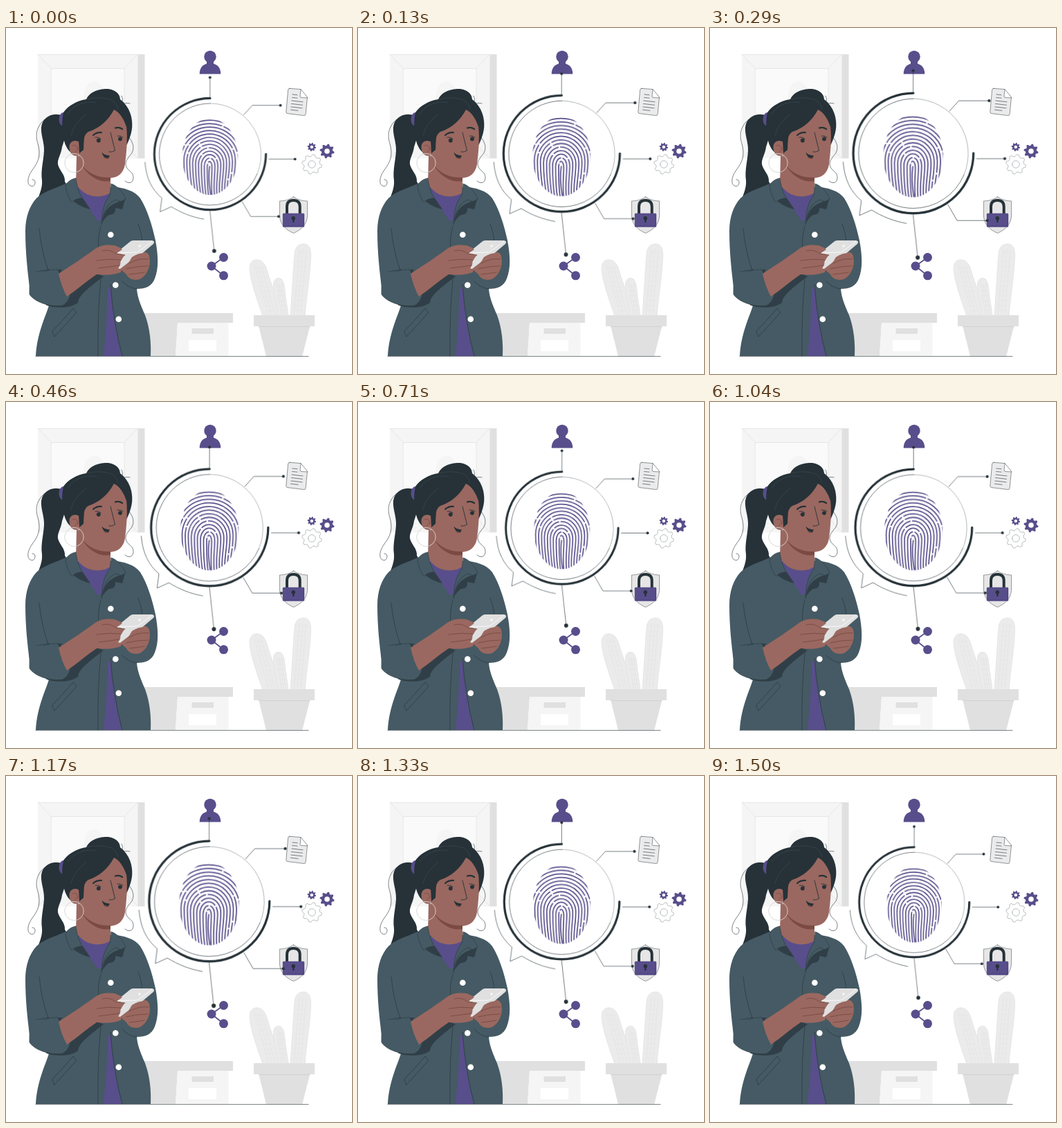
Write an HTML page that moves like this. It is 500 px wide and 500 px high and loops after 1540 ms.

```html
<!DOCTYPE html>
<html lang="en">
<head>
<meta charset="utf-8">
<title>Fingerprint access</title>
<style>
  html, body { margin: 0; width: 100%; height: 100%; overflow: hidden; background: #fff; }
  svg { display: block; width: 100vw; height: 100vh; }
  path { stroke-linejoin: round; stroke-linecap: round; }
  .dark { fill: #263238; }
  .coat { fill: #455a64; }
  .shade { fill: #303f47; }
  .skin { fill: #9a6860; }
  .blush { fill: #7b4a43; }
  .purple { fill: #584e8b; }
  .g1 { fill: #f5f5f5; }
  .g2 { fill: #ebebeb; }
  .g3 { fill: #e0e0e0; }
  .white { fill: #fff; }
  .ink { fill: none; stroke: #263238; stroke-width: .6; }
  .pale { fill: none; stroke: #e0e0e0; stroke-width: .7; }
  #pulse { transform-origin: 310px 197px; }
</style>
</head>
<body>
<svg viewBox="0 0 500 500">
  <defs>
    <clipPath id="oval"><ellipse cx="295" cy="186" rx="39.500" ry="54.500"/></clipPath>
  </defs>

  <!-- room -->
  <path class="g3" d="M190 38H200.500V188.500H190Z"/>
  <path class="g1" d="M46 38H190.500V188.500H46Z"/>
  <path fill="#fafafa" stroke="#e0e0e0" stroke-width=".7" d="M65.500 58.500H171V168H65.500Z"/>
  <path class="g1" d="M112 103Q114 78 128 77Q141 78 144 103Z"/>
  <path class="pale" d="M46 38.500H190M46 38L65.500 58.500M190.500 38L171 58.500M190.500 188L171 168M46 188L65.500 168"/>
  <path class="g3" d="M195 412H328V426H248L245 474H195Z"/>
  <path class="g1" d="M248 426H321.500V474H245Z"/>
  <path class="g3" d="M268.500 434H300V442H268.500Z"/>
  <path class="white" d="M264 451H304V467H264Z"/>

  <!-- cacti -->
  <g class="g2" stroke="#e3e3e3" stroke-width=".8">
    <path d="M371 416C363 393 353 366 352 348C352 338 358 334 364 335C372 336 376 344 379 356C385 376 394 395 397 416Z"/>
    <path d="M393 416C390 398 386 382 386.500 370C387 363 391 361 395 361.500C400 362 402 369 403 379C404 392 407 404 408 416Z"/>
    <path d="M411 416C413 385 415 352 417 326C418 316 423 312 430 312C437 312 441 318 440.500 329C440 356 434 388 432 416Z"/>
  </g>
  <g id="spikes" class="pale"></g>
  <path class="g3" d="M365 430H439.500L428 474.500H376Z"/>
  <path class="g3" d="M358 415H446V431H358Z"/>
  <path d="M365.500 431.500H439" stroke="#d2d2d2" fill="none"/>

  <!-- icons -->
  <g class="purple">
    <circle cx="295" cy="41.500" r="8.700"/>
    <path d="M279.700 66.500C279.700 56 286 51 295 51S310.300 56 310.300 66.500Z"/>
    <path d="M290 48H300V54H290Z"/>
    <path d="M314.500 331.500L297 344L314.500 358" fill="none" stroke="#584e8b" stroke-width="1.700"/>
    <circle cx="314.500" cy="331.500" r="6.500"/><circle cx="297" cy="344" r="6.500"/><circle cx="314.500" cy="357.800" r="6.500"/>
  </g>
  <path fill="#ebebeb" stroke="#263238" stroke-width=".5" d="M410 87.300L426 88.600L435.500 100L433 124.500Q432.700 126.800 430.500 126.500L407 123.600Q404.500 123.200 404.800 121L407.600 89.500Q407.900 87.200 410 87.300ZM426 88.600L425 99Q425 100.300 427 100.500L435.500 101"/>
  <path class="ink" d="M414 96L421 96.700M413.600 100.500L421 101.200M413 105L429 106.800M412.500 109.500L428.500 111.300M412 114L428 115.800M411.600 118.200L422 119.400"/>
  <path id="gearS" class="purple" fill-rule="evenodd"/>
  <path id="gearM" class="purple" fill-rule="evenodd"/>
  <path id="gearL" fill="#fff" stroke="#8b9297" stroke-width=".6"/>
  <path fill="#e6e6e6" stroke="#263238" stroke-width=".45" d="M415.500 244Q424 250 435.500 250V272C435 284 426 292 415.500 296.500C405 292 396 284 395.500 272V250Q407 250 415.500 244Z"/>
  <path d="M406 269V258Q406 249 415.300 249Q424.700 249 424.700 258V269" fill="none" stroke="#263238" stroke-width="4"/>
  <rect class="purple" x="399.800" y="267.800" width="31.400" height="20" rx="1.500"/>
  <path d="M401 286H430V270" fill="none" stroke="#473f73" stroke-width=".6"/>
  <path class="dark" d="M415.300 272A2.800 2.800 0 0 1 416.600 277.300L416.300 281H414.300L414 277.300A2.800 2.800 0 0 1 415.300 272Z"/>

  <!-- speech ring -->
  <g id="pulse">
    <path class="ink" d="M202.500 194C204 216 212 233 226.500 245L224 264.500L240 257.300C254 266 269 272 286 275"/>
    <path class="ink" d="M295.300 110.300A72.400 72.400 0 0 0 295.300 255.100A72.400 72.400 0 0 0 362 211"/>
    <path class="ink" stroke-opacity=".55" d="M295.300 110.300A72.400 72.400 0 0 1 362 211"/>
    <path d="M295.200 102.900A79.400 79.400 0 1 0 374.600 182.300" fill="none" stroke="#263238" stroke-width="3"/>
    <path class="ink" d="M295 73.300V102M343 126.500L355.300 113H395M379 189.500H416M341 250.500L353 271.200H393M295 264L301 320"/>
    <g class="dark">
      <circle cx="295" cy="73.300" r="1.900"/><circle cx="395.300" cy="113" r="1.900"/><circle cx="416" cy="189.500" r="1.900"/>
      <circle cx="392.700" cy="271.200" r="1.900"/><circle cx="301" cy="320.200" r="2.800"/>
    </g>
    <g id="print" clip-path="url(#oval)" fill="none" stroke="#584e8b" stroke-width="1.600"></g>
  </g>

  <path class="ink" d="M43 474.500H437"/>

  <!-- hair behind -->
  <path class="dark" d="M84 128C74 122 60 124 53 136C47 149 56 163 55 178C54 193 50 206 52 220C53 231 48 240 46 248C56 243 74 241 90 230L85 222C86 212 77 206 75 197C74 189 80 182 81 172L88 150Z"/>
  <path class="ink" d="M56 132C44 142 42 154 46 167C50 181 48 191 41 201C35 209 31 216 32 223C33 230 42 231 42 223Q42 219 38 219"/>
  <ellipse class="purple" cx="83" cy="132" rx="6.500" ry="10"/>
  <path class="dark" d="M150 96C166 100 177 112 181 128C184 142 182 153 174 170L160 160Z"/>
  <path class="ink" d="M175 155C183 163 187 173 181 182C175 189 171 194 174 201C177 207 184 208 184 216C184 224 177 226 172 221M167 111Q170 103 167 98M166 112Q172 107 179 109"/>

  <!-- neck and shirt -->
  <path class="purple" d="M100 230L154 230L160 250L168 474H138L120 270Z"/>
  <path class="skin" d="M102 184L151 205V238Q141 245 126 243Q112 241 101 226Z"/>

  <!-- face -->
  <path class="skin" d="M108 150L128 117L163 109C171 117 173 128 174 141C176 160 174 181 172 197C170 209 163 216 150 217C134 217 115 207 105 191Z"/>
  <path class="blush" d="M108 196C119 211 134 217 151 216V221C135 224 119 215 108 196Z"/>
  <path class="dark" d="M106 180Q112 177 112 168C112 159 114 153 119 150C134 145 147 135 156 118C163 121 170 130 174 143C180 128 176 113 165 105C166 94 155 87 143 88C130 89 120 94 116 103C102 105 89 113 83 122C80 136 81 150 84 163C87 174 92 180 98 182Z"/>
  <path d="M116 103Q136 98 153 104Q160 108 162 117M89 125C98 109 118 105 130 108M94 155Q98 137 116 125" fill="none" stroke="#45535a" stroke-width=".5"/>
  <path class="skin" d="M106 165C98 160 91 165 91.500 173C92 182 98 187 106 184Z"/>
  <path d="M96 170Q103 167 104 176Q101 175 100 180" fill="none" stroke="#7b4a43" stroke-width=".8"/>
  <path class="dark" d="M105 162L113 153L112 176L106 181Z"/>
  <circle cx="98.500" cy="195" r="13.700" fill="none" stroke="#d4d4d4" stroke-width=".9"/>
  <g fill="none" stroke="#263238">
    <path stroke-width="2.200" d="M126 155Q131 150.500 138 151M158 144.500Q163 142.500 168 146"/>
    <path stroke-width=".9" d="M129 158Q133 157 137 160M161 156Q165 155 169 158M151 151L157.500 177Q154 180 149 179"/>
  </g>
  <circle class="dark" cx="133.800" cy="162.500" r="2.900"/><circle class="dark" cx="165" cy="160.300" r="2.900"/>
  <path class="dark" d="M138.500 179.500Q142 184 150 184.500L147.500 189Q140 188 138.500 179.500Z"/>
  <path class="blush" d="M141 186Q144 188 148 187.500Q145 191 141 187Z"/>

  <!-- coat -->
  <path class="coat" d="M89 224C72 231 53 237 44 246C34 257 28 273 28 294C28 323 31 350 34 374C35 386 42 394 62 401C57 418 45 440 43 474H141C144 442 147 408 147 373C145 342 139 310 137 285C124 266 110 250 101 222Z"/>
  <path class="coat" d="M153 229C171 231 186 235 194 246C204 262 211 284 216 307C220 329 221 347 215 362C211 373 202 377 189 377C190 390 195 401 201 415C208 434 210 455 209 474H167C160 445 152 402 151 371C143 340 137 307 138 283Z"/>
  <path class="coat" d="M133 278L151 277L158 375H140Z"/>
  <path class="shade" d="M93 240C100 244 106 246 111 246L122 262Q104 258 93 246ZM139 281C141 263 150 254 172 248L168 262L158 260Q159 270 149 270Q144 273 139 281Z"/>
  <path class="coat" stroke="#263238" stroke-width=".5" d="M101 217C95 218 88 222 86 228C87 237 91 246 95 252C99 248 104 246 110 246Q103 234 101 217Z"/>
  <path class="coat" stroke="#263238" stroke-width=".5" d="M152 225C159 227 168 235 173 247L166 251L160 248C150 251 141 260 138 284C138 264 143 250 150 241Z"/>
  <path class="shade" d="M57 400C70 406 94 405 104 397C105 388 113 380 141 359L130 354L92 378L83 399ZM62 356Q66 348 81 349L77 357Z"/>
  <path class="ink" d="M137 286Q132 303 134 322M137 363Q132 414 133 474M48 290Q51 323 62 353M34 352Q47 353 62 349M191 283Q199 304 196 317M67 438Q82 423 97 405L102 411Q86 429 70 446ZM189 377Q177 376 168 366M151 371Q155 425 168 474"/>
  <path class="coat" stroke="#263238" stroke-width=".5" d="M34 374C42 353 60 349 75 349Q83 369 93 385Q91 396 82 401C64 404 41 396 34 385Z"/>
  <path class="coat" d="M33 350Q45 352 60 353Q50 375 50 395Q35 390 34 377Z"/>

  <!-- hands and phone -->
  <path class="skin" d="M76 355C95 343 114 330 129 319Q140 312 156 314L168 319L172 330L166 353C153 358 140 357 131 356C116 366 103 378 88 388Q80 374 76 355Z"/>
  <path class="skin" d="M165 348L187 325Q203 320 207 329Q210 343 203 354Q197 364 187 364Q177 363 174 356Z"/>
  <path class="g3" d="M158 326L179 309Q181 307 184 307L211 307Q216 308 213 312L194 328L178 338L165 348L160 347L170 330Z"/>
  <path d="M161 325L188 324Q191 324 194 321L211 308.500" fill="none" stroke="#fff" stroke-width=".8"/>
  <circle class="white" cx="193" cy="315" r="1.500"/>
  <path class="skin" d="M130 322Q142 313 156 314Q163 316 168 320L160 325.500L172 328L165 336Q167 343 159 351L136 354ZM182 331Q192 324 204 325Q209 330 202 335L186 344Q178 345 176 341Z"/>
  <path fill="none" stroke="#6d423c" stroke-width=".7" d="M139 322Q150 319 158 326L172 328M131 336Q149 333 165 335M134 347Q151 345 164 343M178 340Q192 332 206 334M174 348Q190 344 205 344M178 356Q191 355 200 353"/>

  <g class="white">
    <circle cx="151.300" cy="298.800" r="4.300"/><circle cx="158.300" cy="371.500" r="4.300"/><circle cx="162.800" cy="420.800" r="4.300"/>
  </g>
</svg>
<script>
const $ = id => document.getElementById(id);
const add = (parent, attrs) => {
  const el = document.createElementNS('http://www.w3.org/2000/svg', 'path');
  for (const k in attrs) el.setAttribute(k, attrs[k]);
  parent.append(el);
};

let seed = 7;
const rand = () => (seed = seed * 16807 % 2147483647) / 2147483647;

// Toothed wheel with a round hole
function gear(id, x, y, inner, outer, hole, teeth) {
  const pts = [];
  for (let i = 0; i < teeth * 4; i++) {
    const a = (i + .5) / (teeth * 4) * 2 * Math.PI;
    const r = i % 4 < 2 ? outer : inner;
    pts.push((x + r * Math.cos(a)).toFixed(1) + ' ' + (y + r * Math.sin(a)).toFixed(1));
  }
  $(id).setAttribute('d', `M${pts.join('L')}ZM${x - hole} ${y}a${hole} ${hole} 0 1 0 ${hole * 2} 0a${hole} ${hole} 0 1 0 ${-hole * 2} 0Z`);
}
gear('gearS', 441.8, 172, 4.6, 6.3, 2.2, 8);
gear('gearM', 464, 178, 8, 10.6, 3.8, 8);
gear('gearL', 442, 197, 11.5, 14.3, 5.3, 8);

// Nested arches with legs running down and swaying left
for (let k = 0; k < 13; k++) {
  const rx = 3.4 + 4.15 * k, top = 193 - 4.9 * k, mid = 201 - k * 1.2;
  const lean = k * .5, x0 = 294.5 - rx, x1 = 294.5 + rx;
  const d = `M${x0 + lean + 2} 242C${x0 + lean} 230 ${x0} 216 ${x0} ${mid}` +
    `A${rx} ${mid - top} 0 0 1 ${x1} ${mid}C${x1} 214 ${x1 - lean - 2} 226 ${x1 - lean} 242`;
  const dash = [45 + rand() * 40, 3.4, 70 + rand() * 50, 3.4];
  add($('print'), { d, 'stroke-dasharray': dash.map(n => n.toFixed(1)).join(' ') });
}
add($('print'), { d: 'M294.500 200Q292 218 296 240' });

// Ribs and spines: top x, top y, base x, half width
for (const [tx, ty, bx, w] of [[364, 337, 384, 8], [395, 364, 401, 5], [429, 315, 421, 8]]) {
  let d = '';
  for (const s of [-.6, 0, .6]) {
    d += `M${tx + s * w} ${ty + 6}L${bx + s * w} 414`;
    for (let y = ty + 10; y < 412; y += 7) {
      const x = tx + (bx - tx) * (y - ty) / (415 - ty) + s * w;
      d += `M${x - 2} ${y - 2}l2 2l2 -2`;
    }
  }
  add($('spikes'), { d, 'stroke-width': .5 });
}

// Double beat: time in ms, scale
const LOOP = 1540;
const beat = [[0, 1], [300, 1.1], [895, 1], [1202, 1.1], [LOOP, 1]];
$('pulse').animate(
  beat.map(([t, s]) => ({ offset: t / LOOP, transform: `scale(${s})` })),
  { duration: LOOP, delay: -45, iterations: Infinity }
);
</script>
</body>
</html>
```
